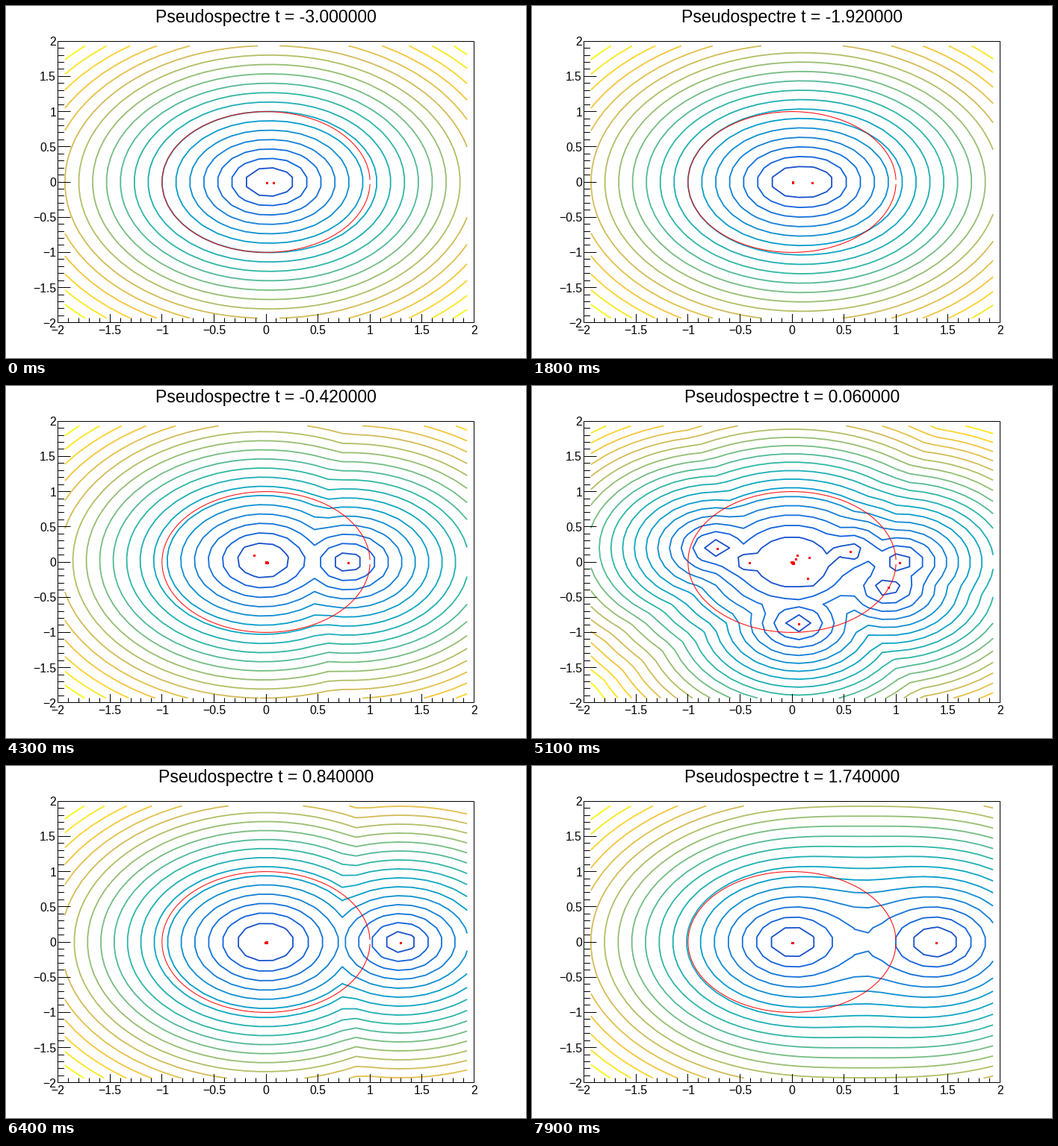
These frames come from a looping animation (696x472 px, 8 s). A matplotlib script:

```python
import numpy as np
import matplotlib.pyplot as plt
from matplotlib.animation import FuncAnimation
from matplotlib.colors import LinearSegmentedColormap

W, H, DPI = 696, 472, 100
PX = 72 / DPI
FRAMES, INTERVAL = 80, 100
BINS, LEVELS = 30, 20
T_PEAK = 0.06

plt.rcParams["font.family"] = "Liberation Sans"

fig = plt.figure(figsize=(W / DPI, H / DPI), dpi=DPI, facecolor="white")
ax = fig.add_axes([0, 0, 1, 1])
ax.set_xlim(0, W)
ax.set_ylim(H, 0)
ax.axis("off")


def sx(x):
    return W / 2 + 0.2 * W * np.asarray(x)


def sy(y):
    return H / 2 - 0.2 * H * np.asarray(y)


STOPS = "#352a87 #0f5cdd #1481d6 #06a4ca #2eb7a4 #87bf77 #d1bb59 #fec832 #f9fb0e"
bird = LinearSegmentedColormap.from_list("bird", STOPS.split(), N=255)
COLORS = [bird(int((k + 0.99) * 255 / LEVELS)) for k in range(1, LEVELS)]

centers = -2 + 4 * (np.arange(BINS) + 0.5) / BINS
GX, GY = np.meshgrid(centers, centers)
Z = GX + 1j * GY

# Eigenvalues that leave the origin around T_PEAK, and a small cluster left there
rng = np.random.default_rng(4)
LEAD = -0.72 + 0.2j
BULK = np.array([-0.415, 0.05 + 0.1j, 0.16 + 0.07j, 0.15 - 0.23j,
                 0.555 + 0.15j, 0.92 - 0.36j, 0.06 - 0.87j, 0.03 + 0.05j])
CLUSTER = 0.02 * rng.uniform(0, 1, 6) * np.exp(2j * np.pi * rng.uniform(0, 1, 6))


def bump(t, center, width):
    return np.exp(-((t - center) / width) ** 2)


def spectrum(t):
    """Growing real eigenvalue, then the ones near the origin."""
    g = 1.4 / (1 + np.exp(-(0.93 + 1.7 * t + 0.147 * t**2 + 0.006 * t**3)))
    turn = np.exp(0.87j * (t - T_PEAK))
    lead = LEAD * turn * bump(t, T_PEAK, 0.384)
    rest = np.append(BULK, CLUSTER) * turn * bump(t, T_PEAK, 0.23)
    return g, np.concatenate([[lead], rest, [0]])


def smallest_sv(d1, d2, c):
    """Smallest singular value of [[d1, c], [0, d2]]."""
    total = abs(d1) ** 2 + abs(d2) ** 2 + c ** 2
    prod = abs(d1 * d2)
    root = np.sqrt(np.maximum(total ** 2 - 4 * prod ** 2, 0))
    return prod / np.sqrt((total + root) / 2)


def resolvent(t, g, near):
    """Distance-like surface whose level lines are the pseudospectrum."""
    coupling = 0.11 * bump(t, -1.8, 0.7) + 0.64 * bump(t, 1.74, 0.4)
    jordan = 0.95 * bump(t, T_PEAK, 0.45 if t < T_PEAK else 0.78)
    core = Z - 0.3 * (1 - bump(t, T_PEAK, 0.384)) * near[0]
    parts = [smallest_sv(Z, Z - g, coupling), smallest_sv(core, core, jordan)]
    parts += [abs(Z - lam) for lam in near]
    return np.min(parts, axis=0)


def line(xs, ys, color="black", z=3):
    ax.plot(xs, ys, color=color, lw=PX, zorder=z, snap=False,
            solid_capstyle="butt", solid_joinstyle="miter")


def draw_axes():
    left, right, top, bottom = 69.5, 626.5, 47.5, 424.5
    line([left, right, right, left, left], [top, top, bottom, bottom, top])
    for i in range(41):
        v = -2 + i / 10
        major = i % 5 == 0
        x = np.floor(sx(v)) + 0.5
        y = np.floor(sy(v)) + 0.5
        line([x, x], [bottom, bottom - (11.5 if major else 6)])
        line([left, left + (17 if major else 8.5)], [y, y])
        if major:
            name = f"{v:g}".replace("-", "\u2212")
            style = dict(fontsize=15.8 * PX, va="baseline")
            ax.text(sx(v), 440.5, name, ha="center", **style)
            ax.text(67, sy(v) + 6, name, ha="right", **style)


draw_axes()
theta = np.linspace(0.03, 2 * np.pi - 0.03, 240)
line(sx(np.cos(theta)), sy(np.sin(theta)), "red", 4)
dots, = ax.plot([], [], "s", color="red", ms=3 * PX, mew=0, zorder=5)
title = ax.text(W / 2, 22, "", fontsize=23 * PX, ha="center", va="baseline")
contours = []


def update(n):
    t = round(-3 + 0.06 * n, 6) + 0.0
    g, near = spectrum(t)
    s = resolvent(t, g, near)
    levels = s.min() + np.ptp(s) * np.arange(1, LEVELS) / LEVELS
    while contours:
        contours.pop().remove()
    contours.append(ax.contour(sx(GX), sy(GY), s, levels=levels, colors=COLORS,
                               linewidths=1.8 * PX, antialiased=True, zorder=2))
    eig = np.append(near, g)
    dots.set_data(sx(eig.real) + 0.5, sy(eig.imag) + 0.5)
    title.set_text(f"Pseudospectre t = {t:.6f}")
    return []


anim = FuncAnimation(fig, update, frames=FRAMES, interval=INTERVAL,
                     init_func=lambda: [], repeat=True, repeat_delay=0)
plt.show()
```
